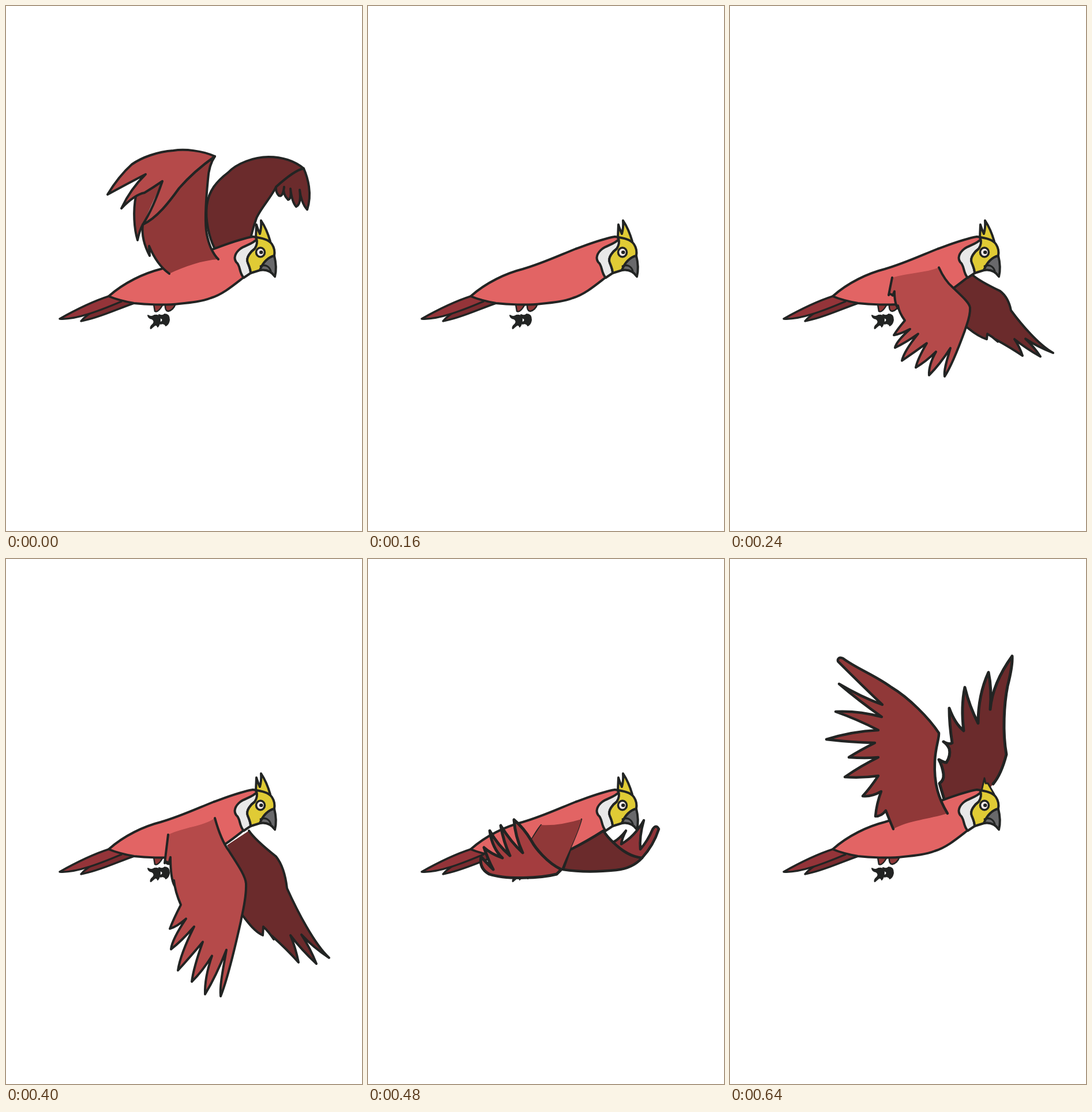
These frames come from a looping animation (617x908 px, 0.72 s). An HTML page with a canvas:

```html
<!DOCTYPE html>
<html lang="en">
<head>
<meta charset="utf-8">
<title>Flying parrot</title>
<style>
html, body { margin: 0; width: 100%; height: 100%; overflow: hidden; background: #fff; }
canvas { display: block; }
</style>
</head>
<body>
<canvas id="stage" width="617" height="908"></canvas>
<script>
const ctx = document.getElementById('stage').getContext('2d');
ctx.lineJoin = ctx.lineCap = 'round';

const INK = '#222423', LIGHT = '#b54a4a', MID = '#903838', DARK = '#6b2b2c';

// A part: stroked outline, fill colour, and an optional unstroked closing edge.
const part = (line, fill, edge = '', width = 4) => ({ line, fill, edge, width });

const tail = [
  part('M222 514C195 523 160 540 130 545C140 533 165 517 200 511', '#7a2b2f', '', 3.5),
  part('M178 502C150 511 118 527 93 541C120 543 160 528 200 511', '#943439', '', 3.5)
];

const legs = [
  part('M256 516L258 528Q264 531 272 516', MID, '', 2.5),
  part('M276 516Q275 527 281 528Q290 526 294 515', MID, '', 2.5),
  part('M246 535Q252 539 257 535Q266 533 267 542Q267 550 263 555Q262 551 258 552' +
    'L251 558Q249 555 255 550Q259 545 253 541Q247 540 246 535', INK, '', 2),
  part('M265 534Q271 537 275 533Q283 533 283 543Q282 550 277 553Q276 550 271 549' +
    'Q266 551 267 547Q273 546 271 541Q265 539 265 534', INK, '', 2)
];

const body = part('M411 470C393 484 375 499 355 505C340 511 320 513 300 515C275 518 240 516 222 514' +
  'C205 511 190 507 178 502C205 478 240 462 268 455C300 446 330 432 360 420C385 411 408 402 428 399',
  '#e26464', 'L440 402L424 462Z');

const crest = part('M433 401L434 378Q437 388 440 394Q443 383 442 371Q452 386 458 407', '#e0cb35');
const lowCrest = part('M436 401L441 379L443 388L447 388L458 407', '#e0cb35', '', 3);

const head = [
  part('M436 402C428 412 414 414 406 420C397 427 394 436 399 443C407 449 403 460 412 470L424 462' +
    'C424 455 421 449 419 444C415 435 425 424 431 420Q437 411 436 402', '#e8e8e8'),
  part('M428 399C440 401 455 403 461 412C465 418 466 426 465 432C455 434 448 443 440 457L424 462' +
    'C424 455 421 449 419 444C415 435 425 424 431 420Q437 411 434 402', '#e0cb35'),
  part('M440 457C445 443 455 434 465 432C468 444 469 456 466 468C460 459 452 455 440 457', '#69696b'),
  part('M441 450Q454 445 459 458', null, '', 3),
  part('M433.500 426A7.500 8 0 1 1 448.500 426A7.500 8 0 1 1 433.500 426', '#f4e9e9', '', 3.5),
  part('M442 426L442.500 426', null, '', 6)
];

const bent = {
  far: [
    part('M361 418C352 400 345 370 348 345C351 320 365 303 385 288C400 272 430 261 455 261' +
      'C480 261 500 268 516 281Q500 284 468 313C460 330 440 352 434 367Q428 384 424 401', DARK),
    part('M468 313Q500 284 516 281C523 297 531 325 522 352C515 345 510 330 509 318' +
      'Q512 343 503 347C496 340 494 325 493 316Q495 334 489 335C482 328 480 320 482 313' +
      'Q480 331 473 328Q467 322 468 313', DARK)
  ],
  near: [
    part('M283 463C265 450 255 432 248 415L249 432C240 415 235 395 237 378C262 366 282 340 300 315' +
      'C320 292 345 272 362 260C355 270 351 285 350 300C348 320 343 370 348 395C352 415 358 428 368 438',
      MID, 'C340 440 310 450 283 463'),
    part('M225 329C220 355 222 385 228 405Q231 389 237 378', MID, 'L271 303L240 323Z'),
    part('M362 260C340 250 310 247 290 250C262 252 235 262 218 274C200 290 187 308 176 326' +
      'Q209 308 242 291Q216 316 200 350Q223 326 240 323Q255 314 271 303Q255 350 237 378' +
      'C262 366 282 340 300 315C320 292 345 272 362 260', LIGHT)
  ]
};

const down = {
  far: [part('M421 468C430 480 455 498 468 507C480 520 485 540 487 555C505 590 535 640 560 660' +
    'Q532 644 512 625Q527 645 538 669Q512 648 493 626Q502 645 507 667C490 650 475 638 461 627' +
    'L464 632Q455 620 446 613L445 626C430 620 418 605 410 596', DARK, 'L416 548L383 490Z')],
  near: [part('M362 449C368 468 375 485 386 498C398 515 415 535 416 548C417 570 410 590 407 605' +
    'C398 640 385 690 372 718C370 700 378 670 382 648Q364 688 345 715Q344 690 357 657' +
    'Q340 681 322 696Q325 675 341 636Q319 659 298 679Q302 655 326 613Q304 635 286 647' +
    'Q288 632 312 601Q296 613 284 616Q290 602 303 580Q293 560 291 543L292 551Q285 540 285 508' +
    'L282 518Q277 512 275 517Q278 495 281 474', LIGHT, 'C310 462 340 462 362 449')]
};

const folded = {
  over: true,
  far: [
    part('M408 470C380 488 360 498 350 503L338 537C370 542 400 541 430 538C450 536 465 528 475 517' +
      'C455 515 440 505 425 490Q415 481 408 470', DARK, '', 4.5),
    part('M425 490Q437 483 447 470Q440 483 439 493Q462 480 478 452Q470 480 472 502' +
      'Q485 487 493 468Q499 458 504 467Q495 495 475 517Q450 514 425 490', '#903438', '', 4.5)
  ],
  near: [
    part('M283 486Q292 470 300 460M370 450C362 480 345 510 335 537', null, '', 2.5),
    part('', MID, 'M300 460Q330 462 370 450C362 480 345 510 335 537Q307 520 283 486Z'),
    part('M335 537C310 525 290 500 283 487Q270 465 253 451Q255 480 268 508Q248 490 230 461' +
      'Q235 490 246 513Q225 495 211 470Q215 500 233 517Q213 510 201 499Q208 520 217 537' +
      'Q205 525 196 515Q192 535 210 545C240 555 300 552 327 545Z', '#a43d3f', '', 5)
  ]
};

const rising = {
  crest: lowCrest,
  far: [part('M352 423Q362 395 359 370Q363 380 367 382Q379 360 366 312Q376 340 397 356' +
    'Q404 310 389 262C402 285 412 325 432 342Q437 280 426 223C440 255 443 295 461 320' +
    'Q475 245 478 190Q488 210 493 250C496 290 490 330 489 350Q481 391 467 411', DARK, 'L430 425Z', 6.5)],
  near: [part('M361 454C350 438 338 420 335 405C330 390 332 378 329 365C300 345 270 320 255 300' +
    'C235 275 215 240 203 220C198 213 192 218 192 235C192 265 205 295 235 329C205 310 170 285 153 257' +
    'C160 280 190 310 210 348Q176 337 142 320Q160 343 214 391Q188 394 150 387Q187 402 224 429' +
    'Q200 438 177 435Q202 450 240 463Q226 470 213 466Q225 474 238 474Q230 481 250 485L278 487',
    MID, 'C295 470 330 466 361 454', 5.5)]
};

const raised = {
  crest: lowCrest,
  far: [part('M371 415L363 388Q371 383 370 372Q368 358 362 347Q371 352 375 352Q383 340 380 328' +
    'Q376 320 370 316Q380 322 385 318Q380 285 380 258Q390 285 405 297Q400 255 407 222' +
    'Q415 255 430 284Q430 235 448 196Q454 225 451 260Q455 215 489 168Q490 185 481 220' +
    'C475 250 472 300 479 338Q470 373 456 389', DARK, 'L440 410Z', 5)],
  near: [part('M377 440C362 415 353 390 355 350C356 325 363 310 362 301C345 275 310 240 280 222' +
    'C250 200 220 190 196 172C188 168 185 175 188 178Q228 218 264 252Q226 238 189 216' +
    'Q223 245 263 273Q221 262 183 264Q220 277 257 296Q211 298 167 312Q210 317 251 318' +
    'Q223 332 206 343Q235 345 257 343Q228 357 199 377Q229 379 257 375Q243 396 230 410' +
    'Q244 412 262 402Q254 423 252 445Q263 445 270 435Q275 448 283 467',
    MID, 'C310 452 345 450 377 440', 4.5)]
};

// Vertical stretch of a wing pose about the shoulder line.
const stretch = (pose, y, k) => ({ ...pose, matrix: new DOMMatrix([1, 0, 0, k, 0, y * (1 - k)]) });

const poses = [
  bent, stretch(bent, 438, 0.55), { far: [], near: [] },
  stretch(down, 460, 0.7), down, stretch(down, 455, 1.145),
  folded, rising, raised
];

function draw(parts, matrix) {
  const shape = d => {
    const path = new Path2D();
    path.addPath(new Path2D(d), matrix);
    return path;
  };
  for (const { line, fill, edge, width } of parts) {
    if (fill) {
      ctx.fillStyle = fill;
      ctx.fill(shape(line + edge));
    }
    ctx.strokeStyle = INK;
    ctx.lineWidth = width;
    ctx.stroke(shape(line));
  }
}

function frame(now) {
  const pose = poses[Math.floor(now / 80) % poses.length];
  const far = () => draw(pose.far, pose.matrix);
  ctx.fillStyle = '#fff';
  ctx.fillRect(0, 0, 617, 908);
  if (!pose.over) far();
  draw([...tail, ...legs, body, pose.crest || crest, ...head]);
  if (pose.over) far();
  draw(pose.near, pose.matrix);
  requestAnimationFrame(frame);
}
requestAnimationFrame(frame);
</script>
</body>
</html>
```
